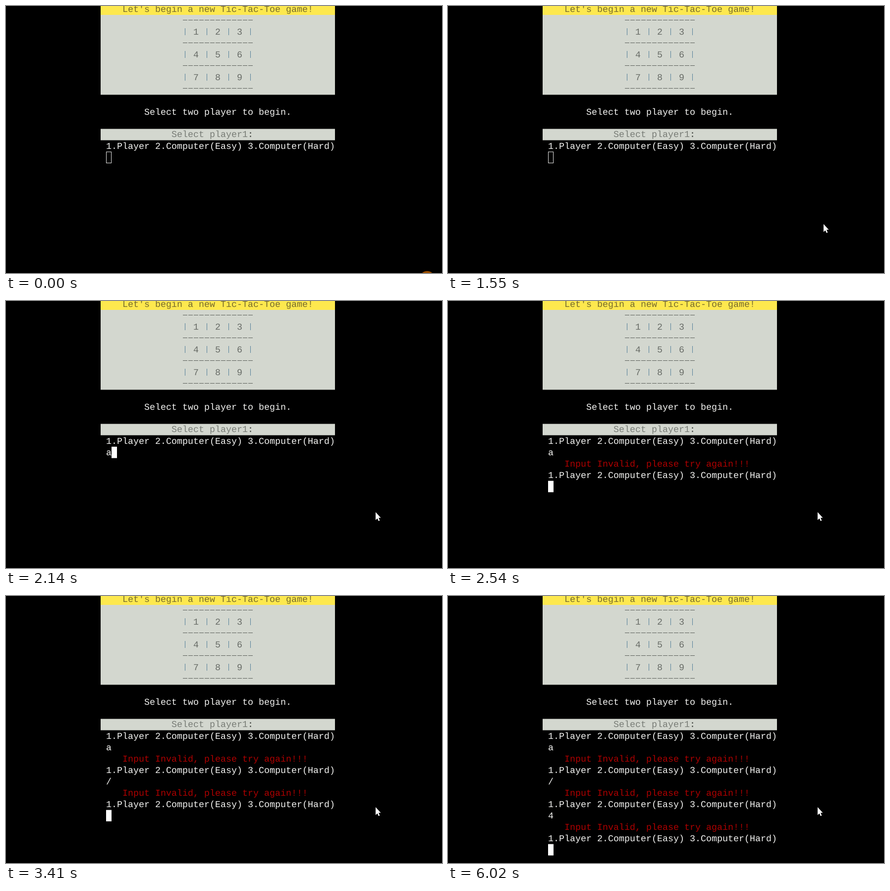
An HTML page that plays this animation: 880x540 px, repeating every 8 s.

```html
<!DOCTYPE html>
<html lang="en">
<head>
<meta charset="utf-8">
<title>Tic-Tac-Toe terminal</title>
<style>
  html, body { margin: 0; width: 100%; height: 100%; overflow: hidden; background: #000; }
  svg { display: block; width: 880px; height: 540px; }
  text {
    font: 18.333px "Courier New", "Liberation Mono", monospace;
    white-space: pre; fill: #f4f4f2; text-rendering: geometricPrecision;
  }
  .title { fill: #776b2c; }
  .cell { fill: #686c67; }
  .label { fill: #787c76; }
  .error { fill: #ae0000; }
  .dash { stroke: #5c605b; stroke-width: 1; stroke-dasharray: 9 2; }
  .bar { stroke: #56819a; stroke-width: 1; }

  .step { animation: 8s step-end infinite; }
  .ring { animation-name: ring; }
  .hollow { animation-name: hollow; }
  .block { animation-name: block; }
  .key1 { animation-name: key1; }
  .key2 { animation-name: key2; }
  .key3 { animation-name: key3; }
  .reply1 { animation-name: reply1; }
  .reply2 { animation-name: reply2; }
  .reply3 { animation-name: reply3; }
  .mouse { animation-name: mouse; }
  .halo { animation-name: halo; }

  @keyframes ring { 0% { visibility: visible } 2.5%, 100% { visibility: hidden } }
  @keyframes hollow { 0% { visibility: visible } 21.875%, 100% { visibility: hidden } }
  @keyframes key1 { 0% { visibility: hidden } 26.75%, 100% { visibility: visible } }
  @keyframes reply1 { 0% { visibility: hidden } 31.75%, 100% { visibility: visible } }
  @keyframes key2 { 0% { visibility: hidden } 41%, 100% { visibility: visible } }
  @keyframes reply2 { 0% { visibility: hidden } 42.625%, 100% { visibility: visible } }
  @keyframes key3 { 0% { visibility: hidden } 67.625%, 100% { visibility: visible } }
  @keyframes reply3 { 0% { visibility: hidden } 75.25%, 100% { visibility: visible } }
  @keyframes halo {
    0% { visibility: hidden }
    21.875% { visibility: visible }
    24.25%, 100% { visibility: hidden }
  }
  @keyframes block {
    0% { visibility: hidden; transform: none }
    21.875% { visibility: visible; transform: none }
    26.75% { visibility: visible; transform: translate(11px, 0) }
    31.75% { visibility: visible; transform: translate(0, 69px) }
    41% { visibility: visible; transform: translate(11px, 69px) }
    42.625% { visibility: visible; transform: translate(0, 138px) }
    67.625% { visibility: visible; transform: translate(11px, 138px) }
    75.25%, 100% { visibility: visible; transform: translate(0, 207px) }
  }
  @keyframes mouse {
    0% { visibility: hidden; transform: translate(806px, 498px) }
    16% { visibility: visible; transform: translate(806px, 498px) }
    16.75% { visibility: visible; transform: translate(789px, 477px) }
    17.75% { visibility: visible; transform: translate(771px, 456px) }
    18.75% { visibility: visible; transform: translate(758px, 441px) }
    19.875% { visibility: visible; transform: translate(750px, 432px) }
    20.875%, 100% { visibility: visible; transform: translate(746px, 427px) }
  }
</style>
</head>
<body>
<svg viewBox="0 0 880 540">
  <defs>
    <text id="menu" x="202">1.Player 2.Computer(Easy) 3.Computer(Hard)</text>
    <text id="error" class="error" x="235">Input Invalid, please try again!!!</text>
    <path id="dashes" class="dash" d="M357 0h141"/>
    <path id="bars" class="bar" d="M361.5 0v14M405.5 0v14M449.5 0v14M493.5 0v14"/>
  </defs>

  <path fill="#fde84e" d="M191 0h473v18H191z"/>
  <path fill="#d3d7cf" d="M191 18h473v161.6H191zM191 248.4h473v23H191z"/>

  <text class="title" x="235" y="11.5">Let's begin a new Tic-Tac-Toe game!</text>
  <use href="#dashes" y="28.5"/>
  <use href="#dashes" y="74.5"/>
  <use href="#dashes" y="120.5"/>
  <use href="#dashes" y="166.5"/>
  <use href="#bars" y="45"/>
  <use href="#bars" y="91"/>
  <use href="#bars" y="137"/>
  <text class="cell" x="378" y="57.5">1   2   3</text>
  <text class="cell" x="378" y="103.5">4   5   6</text>
  <text class="cell" x="378" y="149.5">7   8   9</text>

  <text x="279" y="219.5">Select two player to begin.</text>
  <text class="label" x="334" y="265">Select player1<tspan fill="#3c3e3a">:</tspan></text>
  <use href="#menu" y="289"/>

  <text class="step key1" x="202" y="312">a</text>
  <g class="step reply1">
    <use href="#error" y="335"/>
    <use href="#menu" y="358"/>
  </g>
  <text class="step key2" x="202" y="381">/</text>
  <g class="step reply2">
    <use href="#error" y="404"/>
    <use href="#menu" y="427"/>
  </g>
  <text class="step key3" x="202" y="450">4</text>
  <g class="step reply3">
    <use href="#error" y="473"/>
    <use href="#menu" y="496"/>
  </g>

  <rect class="step hollow" x="202.5" y="295" width="10" height="22.5" fill="none" stroke="#eeeeec"/>
  <rect class="step block" x="202" y="294.7" width="11" height="23" fill="#fff"/>

  <circle class="step ring" cx="850" cy="551" r="15" fill="#9a4d00"/>
  <path class="step mouse" fill="#fff" d="M0 0V16L3.5 12.7 6 18 8.4 17 6 11.5H10.5z"/>
  <circle class="step halo" cx="745" cy="426" r="15" fill="#ff0" fill-opacity=".49"/>
</svg>
</body>
</html>
```
